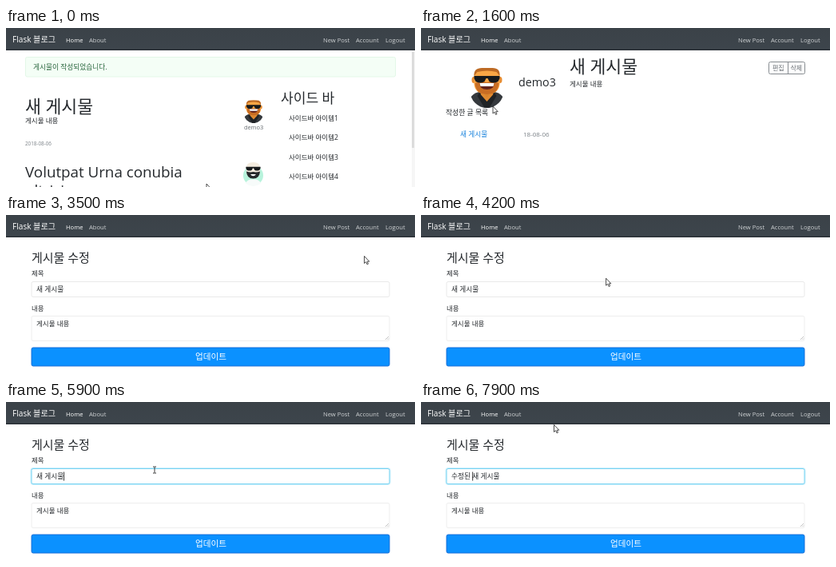
Recreate the animation shown at these times as an HTML page. Size 512x199 px, loop 8 s.

```html
<!DOCTYPE html>
<html lang="ko">
<head>
<meta charset="utf-8">
<title>Flask 블로그</title>
<style>
  html, body { margin: 0; width: 100%; height: 100%; overflow: hidden; background: #fff; }
  svg { display: block; width: 100%; height: 100%; }
  text { font-family: "Open Sans", "Noto Sans CJK KR", "Noto Sans CJK", sans-serif; white-space: pre; }
</style>
</head>
<body>
<svg id="stage" viewBox="0 0 512 199" preserveAspectRatio="none">
  <defs>
    <linearGradient id="navFill" x2="0" y2="1">
      <stop offset="0" stop-color="#3b4248"/><stop offset="1" stop-color="#3d454c"/>
    </linearGradient>
    <clipPath id="round"><path d="M0 0H42V30A21 21 0 0 1 0 30Z"/></clipPath>
    <g id="shades">
      <path d="M5 11H37V14L35 18Q29 21 24 18L22 14H20L18 18Q13 21 7 18L5 14Z" fill="#171a1c"/>
    </g>
    <g id="man">
      <g clip-path="url(#round)">
        <path d="M0 51V39Q3 33 11 31H31Q39 33 42 39V51Z" fill="#35393d"/>
        <path d="M14 28H28V34L21 40L14 34Z" fill="#d8842c"/>
        <path d="M12 31L21 41L30 31L33 36L24 51H18L9 36Z" fill="#202326"/>
        <path d="M15 31L21 38L27 31L29 34L21 43L13 34Z" fill="#e08a30"/>
      </g>
      <ellipse cx="4.5" cy="16" rx="2.5" ry="4" fill="#e88d31"/>
      <ellipse cx="37.5" cy="16" rx="2.5" ry="4" fill="#e88d31"/>
      <path d="M5 12Q5 1 21 1Q37 1 37 12V22Q35 34 21 34Q7 34 5 22Z" fill="#f9a645"/>
      <path d="M5 11Q4 1 15 1H28Q38 1 37 11L33 6Q21 3 9 6Z" fill="#bd6a24"/>
      <path d="M6 20Q13 17 21 19Q29 17 36 20Q35 34 21 34Q7 34 6 20Z" fill="#c96e24"/>
      <path d="M12 20H30Q30 28 21 28Q12 28 12 20Z" fill="#64251d"/>
      <path d="M12 20H30L29 24H13Z" fill="#fff"/>
      <use href="#shades"/>
    </g>
    <g id="baldMan">
      <circle cx="21" cy="30" r="22" fill="#b8f3dc"/>
      <path d="M4 47Q8 38 21 38Q34 38 38 47Q31 53 21 53Q11 53 4 47Z" fill="#f7fbfa"/>
      <path d="M6 13Q6 1 21 1Q36 1 36 13V23Q34 36 21 36Q8 36 6 23Z" fill="#f4ecdf"/>
      <path d="M6 21Q14 24 21 22Q28 24 36 21Q35 37 21 37Q7 37 6 21Z" fill="#26292b"/>
      <path d="M15 27H27Q25 31 21 31Q17 31 15 27Z" fill="#fff"/>
      <use href="#shades"/>
    </g>
  </defs>
  <rect width="512" height="199" fill="#fff"/>
  <g id="nav">
    <rect width="512" height="28" fill="url(#navFill)"/>
    <rect y="26.5" width="512" height="1.5" fill="#2b3137"/>
  </g>
  <g id="list"></g>
  <g id="post"></g>
  <g id="edit"></g>
  <g id="cursor">
    <path id="arrow" d="M0 0V9L2.1 7.2L3.6 10.4L5 9.7L3.6 6.7H6.3Z" fill="#fff" stroke="#222" stroke-width=".8"/>
    <path id="hand" d="M0 0Q1.4 -.8 1.6 1V4Q3 3.2 3.4 4.4Q4.8 3.8 5 5Q6.4 4.6 6.4 6V8.6L5.4 11H.2L-2.8 7Q-3 5.4 -1.4 6L-.4 7V1Q-.5 .3 0 0Z" fill="#fff" stroke="#222" stroke-width=".8"/>
    <path id="beam" d="M-2 -4H-.6L0 -3.5L.6 -4H2M0 -3.5V3.5M-2 4H-.6L0 3.5L.6 4H2" fill="none" stroke="#222" stroke-width=".9"/>
  </g>
</svg>
<script>
const LOOP = 8000;
const USER = "demo3", TITLE = "새 게시물", BODY = "게시물 내용";
const DARK = "#24282c", GRAY = "#7b8187";
const $ = id => document.getElementById(id);

function add(parent, tag, attrs, content) {
  const node = document.createElementNS("http://www.w3.org/2000/svg", tag);
  for (const key in attrs) node.setAttribute(key, attrs[key]);
  if (content) node.textContent = content;
  parent.appendChild(node);
  return node;
}
const label = (parent, content, x, y, size, fill = DARK, extra = {}) =>
  add(parent, "text", { x, y, "font-size": size, fill, ...extra }, content);
const box = (parent, x, y, width, height, fill, stroke, rx = 2) =>
  add(parent, "rect", { x, y, width, height, fill, stroke, rx, "stroke-width": 1 });
const avatar = (parent, id, x, y, scale) =>
  add(parent, "use", { href: "#" + id, transform: `translate(${x} ${y}) scale(${scale})` });
const show = (node, on) => node.setAttribute("visibility", on ? "inherit" : "hidden");

const nav = $("nav"), list = $("list"), post = $("post"), edit = $("edit");

// Navigation bar
label(nav, "Flask 블로그", 8, 18, 10.1, "#fff");
label(nav, "Home", 75, 18, 7.6, "#fff", { "font-weight": 500 });
[["About", 104], ["New Post", 397], ["Account", 438], ["Logout", 475]]
  .forEach(([name, x]) => label(nav, name, x, 18, 7.6, "#d0d3d5"));

// Post list
box(list, 24.5, 36.5, 463, 24.5, "#f4fef6", "#e3f7e7");
label(list, "게시물이 작성되었습니다.", 34, 52, 8.7, "#25633a", { "font-weight": 500 });
const link = label(list, TITLE, 24, 105.5, 21.6);
const underline = add(list, "rect", { x: 24, y: 107.5, width: 85, height: 1.2, fill: "#1434a4" });
label(list, BODY, 24, 119, 8.5);
label(list, "2018-08-06", 24, 147, 6.3, GRAY);
label(list, "Volutpat Urna conubia", 24, 187, 18.8);
label(list, "ultricies", 24, 210, 18.8);
avatar(list, "man", 298, 90, .57);
label(list, USER, 310, 127, 7.4, "#666b70", { "text-anchor": "middle" });
avatar(list, "baldMan", 297.5, 167.5, .57);
label(list, "사이드 바", 344, 93.5, 17.1);
for (let i = 0; i < 4; i++) label(list, `사이드바 아이템${i + 1}`, 354, 116 + 24.3 * i, 8.5);
add(list, "rect", { x: 508, y: 28, width: 4, height: 171, fill: "#f6f6f6" });
add(list, "rect", { x: 508, y: 30, width: 3, height: 120, fill: "#dcdcdc" });

// Single post
avatar(post, "man", 61.5, 49, 1);
label(post, USER, 122, 73, 14.3);
label(post, "작성한 글 목록", 31, 109, 8.8);
label(post, TITLE, 49, 136, 8.7, "#1681dc");
label(post, "18-08-06", 128, 136, 8, GRAY);
label(post, TITLE, 186, 56, 21.6);
label(post, BODY, 186, 73, 8.5);
box(post, 435.5, 42.5, 45, 15, "#fff", "#858a8f");
add(post, "path", { d: "M459.5 42.5V57.5", stroke: "#858a8f" });
label(post, "편집", 440, 53, 8, "#666c72");
label(post, "삭제", 462.5, 53, 8, "#666c72");

// Edit form
label(edit, "게시물 수정", 32, 58.5, 15);
label(edit, "제목", 32, 76, 8.4);
const glow = box(edit, 31.5, 83, 449, 20, "none", "#c9effc", 3);
glow.setAttribute("stroke-width", 2);
const input = box(edit, 32, 83.5, 448, 19, "#fff", "#eeeeee");
const value = label(edit, TITLE, 38, 96, 8.7);
const caret = add(edit, "rect", { y: 87.5, width: .9, height: 11, fill: "#222" });
const handle = add(edit, "path", {
  d: "M72 100.5L75.6 104.2A4.9 4.9 0 1 1 68.4 104.2Z", fill: "#27bdf0", stroke: "#1aa3d6", "stroke-width": .6
});
label(edit, "내용", 32, 119.5, 8.4);
box(edit, 32, 126.5, 448, 31, "#fff", "#eeeeee");
label(edit, BODY, 38, 139, 8.5);
add(edit, "path", { d: "M475 156L479 152M477.5 156L479 154.5", stroke: "#999", "stroke-width": .6 });
box(edit, 32, 166, 448, 23, "#0b91ff", "#176fd8");
label(edit, "업데이트", 256.5, 181, 10.6, "#fff", { "text-anchor": "middle" });

// Pointer stops: [time, x, y]
const stops = [
  [0, 251, 195], [150, 251, 195], [950, 90, 98], [1650, 90, 98], [2450, 414.5, 58],
  [2600, 414.5, 58], [2850, 448.5, 51.5], [3650, 448.5, 51.5], [4400, 186, 85],
  [7250, 186, 85], [7700, 166.5, 28.5], [8000, 166.5, 28.5]
];
// Hangul composition: [time, text before the title]
const typing = [
  [6300, "ㅅ"], [6400, "수"], [6550, "숮"], [6650, "수저"], [6750, "수정"],
  [6850, "수정ㄷ"], [6950, "수정되"], [7050, "수정된"], [7150, "수정된 "]
];

function pointerAt(t) {
  const i = Math.max(1, stops.findIndex(stop => stop[0] > t));
  const [t0, x0, y0] = stops[i - 1], [t1, x1, y1] = stops[i];
  const p = (t - t0) / (t1 - t0), eased = p * p * (3 - 2 * p);
  return [x0 + (x1 - x0) * eased, y0 + (y1 - y0) * eased];
}

function render(t) {
  const page = t < 1500 ? list : t < 3000 ? post : edit;
  [list, post, edit].forEach(view => show(view, view === page));

  const [x, y] = pointerAt(t);
  const hover = page === list && x < 109 && y < 109;
  link.setAttribute("fill", hover ? "#1434a4" : DARK);
  show(underline, hover);

  const focus = Math.min(1, Math.max(0, (t - 4800) / 150));
  input.setAttribute("stroke", focus > .5 ? "#79d3f1" : "#e9e9e9");
  glow.setAttribute("opacity", focus);
  const typed = typing.filter(step => step[0] <= t).pop();
  const prefix = typed ? typed[1] : "";
  value.textContent = prefix + TITLE;
  const start = 38 + (prefix ? value.getSubStringLength(0, prefix.length) : 0);
  caret.setAttribute("x", t < 6000 ? 72 : start);
  show(caret, page === edit && t >= 4750 && (t - 4750) % 1000 < 500);
  show(handle, page === edit && t >= 4750 && t < 5700);

  const overInput = page === edit && x > 32 && x < 480 && y > 83 && y < 103;
  const overButton = page === post && x > 435 && y < 58;
  const overLink = hover || overButton;
  $("cursor").setAttribute("transform", `translate(${x} ${y})`);
  show($("beam"), overInput);
  show($("hand"), overLink);
  show($("arrow"), !overInput && !overLink);
}

const began = performance.now();
function tick() {
  render((performance.now() - began) % LOOP);
  requestAnimationFrame(tick);
}
tick();
</script>
</body>
</html>
```
